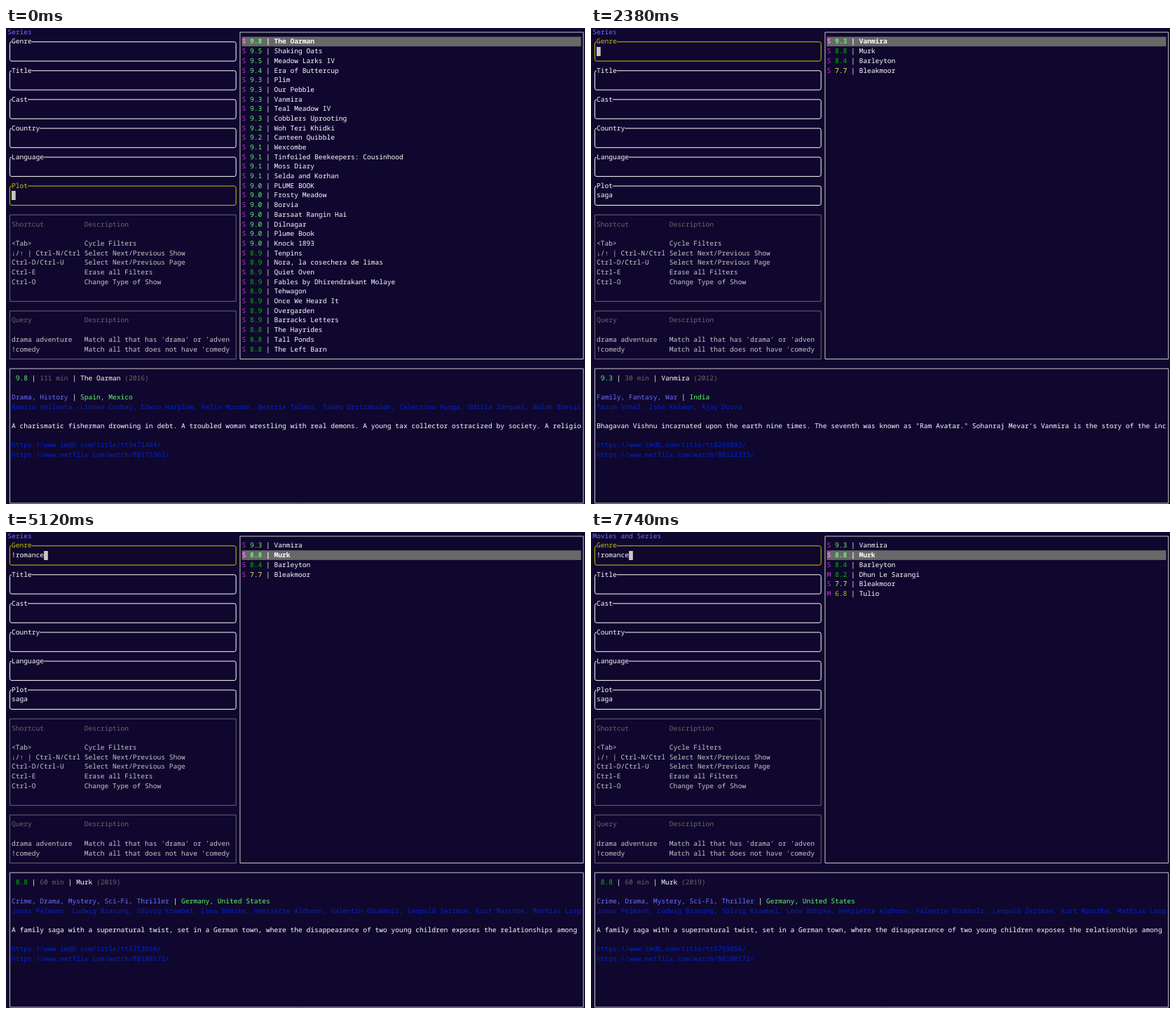
Recreate the animation shown at these times as an HTML page with a canvas. Size 826 by 678 pixels, loop 8 s.

```html
<!DOCTYPE html>
<html lang="en">
<head>
<meta charset="utf-8">
<title>Show finder</title>
<style>
html, body { margin: 0; width: 100%; height: 100%; overflow: hidden; background: #10072e; }
canvas { display: block; }
</style>
</head>
<body>
<canvas id="term" width="826" height="678"></canvas>
<script>
const ctx = document.getElementById('term').getContext('2d');
const LOOP = 8000;
const CW = 5.762, RH = 13.69, X0 = 2.2, Y0 = -1.2;
const C = {
  bg: '#10072e', white: '#fefefe', text: '#c7c7c7', grey: '#686868',
  blue: '#0225c7', sky: '#6871ff', green: '#00c200', lime: '#5ffa68',
  yellow: '#c7c400', lemon: '#fffc67', magenta: '#c930c7', pink: '#ff77ff'
};
const FONT = '9.6px "Noto Sans Mono", "DejaVu Sans Mono", monospace';

const FIELDS = ['Genre', 'Title', 'Cast', 'Country', 'Language', 'Plot'];
const KEYS = [
  ['<Tab>', 'Cycle Filters'],
  ['↓/↑ | Ctrl-N/Ctrl', 'Select Next/Previous Show'],
  ['Ctrl-D/Ctrl-U', 'Select Next/Previous Page'],
  ['Ctrl-E', 'Erase all Filters'],
  ['Ctrl-O', 'Change Type of Show']
];
const QUERIES = [
  ['drama adventure', "Match all that has 'drama' or 'adven"],
  ['!comedy', "Match all that does not have 'comedy"]
];

// Each line: rating, then titles sharing it; a leading * marks a movie.
const parse = src => src.trim().split('\n').flatMap(line => {
  const [score, titles] = line.trim().split(' = ');
  return titles.split('; ').map(t => ({
    score, type: t[0] === '*' ? 'M' : 'S', title: t.replace('*', '')
  }));
});

const ALL = parse(`
  9.8 = The Oarman
  9.5 = Shaking Oats; Meadow Larks IV
  9.4 = Era of Buttercup
  9.3 = Plim; Our Pebble; Vanmira; Teal Meadow IV; Cobblers Uprooting
  9.2 = Woh Teri Khidki; Canteen Quibble
  9.1 = Wexcombe; Tinfoiled Beekeepers: Cousinhood; Moss Diary; Selda and Korhan
  9.0 = PLUME BOOK; Frosty Meadow; Borvia; Barsaat Rangin Hai; Dilnagar; Plume Book; Knock 1893
  8.9 = Tenpins; Nora, la cosechera de limas; Quiet Oven; Fables by Dhirendrakant Molaye
  8.9 = Tehwagon; Once We Heard It; Overgarden; Barracks Letters
  8.8 = The Hayrides; Tall Ponds; The Left Barn`);
const SA = parse(`
  9.3 = Vanmira; Cobblers Uprooting
  9.0 = PLUME BOOK; Borvia; Barsaat Rangin Hai; Dilnagar; Plume Book; Knock 1893
  8.8 = Peculiar Teapot; Murk; Two-Spoon Guy
  8.7 = Gilded Plums; Tobb Wendlecot Has a Sofa
  8.6 = Hiya Walrus; Brenkel
  8.5 = The AV Squad; Tinfoiled Beekeeper; Neighbors of Cutlery
  8.5 = The Dull Lantern: Era of Buttermilk; Puzzled Biscuit Orchard 4100; TinFoiled Beekeeper
  8.4 = Barleyton; Parcel of Intrigue; The Next Duchess; Gulley; Badge of Cocoa
  8.4 = The Walrus Squire; Nieces Cabin; Gulley; Gulley
  8.3 = Brackwen; Baron Meiko: The Worn Fabric; Stella Runi Hanoka Runica`);
const SAGA = parse(`
  9.3 = Vanmira
  8.8 = Murk
  8.4 = Barleyton
  7.7 = Bleakmoor`);
const SAG = SAGA.concat(parse('7.4 = Postcards of Yarn; Umbrella Cottage'));
const MIXED = parse(`
  9.3 = Vanmira
  8.8 = Murk
  8.4 = Barleyton
  8.2 = *Dhun Le Sarangi
  7.7 = Bleakmoor
  6.8 = *Tulio`);

const INFO = {
  'The Oarman': {
    min: 111, year: 2016, genres: 'Drama, History', lands: 'Spain, Mexico',
    cast: 'Ramiro Vellanta, Linnea Corbay, Edwin Harglow, Felix Mordan, Beatrix Tolmer, Tadeo Urrizabalde, Celestino Purga, Odilia Zánquez, Nolan Brevic',
    plot: 'A charismatic fisherman drowning in debt. A troubled woman wrestling with real demons. A young tax collector ostracized by society. A religio',
    imdb: 'tt9471404', watch: '80171962'
  },
  'Vanmira': {
    min: 30, year: 2012, genres: 'Family, Fantasy, War', lands: 'India',
    cast: 'Tarun Vohal, Isha Kelwan, Ajay Dorva',
    plot: 'Bhagavan Vishnu incarnated upon the earth nine times. The seventh was known as "Ram Avatar." Sohanraj Mevar\'s Vanmira is the story of the inc',
    imdb: 'tt0268093', watch: '80122233'
  },
  'Murk': {
    min: 60, year: 2019, genres: 'Crime, Drama, Mystery, Sci-Fi, Thriller', lands: 'Germany, United States',
    cast: 'Jonas Pelmann, Ludwig Brasung, Sölvig Krambel, Lena Böhrke, Henriette Aldhorn, Valentin Grubholz, Leopold Zeitman, Kurt Maschbe, Mathias Lorp',
    plot: 'A family saga with a supernatural twist, set in a German town, where the disappearance of two young children exposes the relationships among',
    imdb: 'tt5753856', watch: '80100172'
  },
  'Barleyton': {
    min: 45, year: 2018, genres: 'Drama, Family', lands: 'Canada',
    cast: 'Maren Tilcott, Shane Worvil, Gemma Lasker, Peter Oldwyn, Kara Brenmoor, Hugh Delby',
    plot: 'A multi-generational saga set on a family ranch, where two sisters and their grandfather get through the highs and lows of life in the hills',
    imdb: 'tt1094229', watch: '70171946'
  },
  'Bleakmoor': {
    min: 60, year: 2017, genres: 'Crime, Drama, Western', lands: 'United States',
    cast: 'Dylan Hartwell-Stone, Brendan Moult, Clara Wynde, Jolanda Perrin, Bartholomew Ostendahl, Rosalyn Mae Thorncote, Sam Olber',
    plot: 'An epic saga about the secret history of the 1930s American grassland, centering on the mythic conflict and bloody struggle between big money',
    imdb: 'tt6106704', watch: '80176771'
  }
};

// Each step changes part of the state from its time on.
const STEPS = [
  [0, { mode: 'Series', focus: 5, genre: '', plot: '', list: ALL, sel: 0 }],
  [710, { plot: 's' }],
  [1010, { plot: 'sa', list: SA }],
  [1270, { plot: 'sag', list: SAG }],
  [1480, { plot: 'saga', list: SAGA }],
  [2380, { focus: 0 }],
  [3280, { genre: '!' }],
  [3640, { genre: '!r', list: [] }],
  [3720, { genre: '!ro', list: SAGA }],
  [3840, { genre: '!rom' }],
  [3960, { genre: '!roman' }],
  [4140, { genre: '!romanc' }],
  [4320, { genre: '!romance' }],
  [5120, { sel: 1 }],
  [5480, { sel: 2 }],
  [5950, { sel: 3 }],
  [6820, { mode: 'Movies and Series', list: MIXED, sel: 0 }],
  [7740, { sel: 1 }]
];

const colX = c => X0 + c * CW;
const rowY = r => Y0 + r * RH;
// Border lines sit slightly right of and below the cell centre.
const midX = c => colX(c + 0.5) + 0.4;
const midY = r => rowY(r + 0.5) + 0.4;

function write(col, row, str, color, bold) {
  ctx.font = (bold ? '700 ' : '500 ') + FONT;
  ctx.fillStyle = color;
  const y = rowY(row + 0.5) + 3.1;
  let c = col;
  for (const ch of str) {
    if (ch !== ' ') ctx.fillText(ch, colX(c), y);
    c++;
  }
  return c;
}

// Writes coloured runs one after another.
function runs(col, row, parts, bold) {
  for (const [str, color] of parts) col = write(col, row, str, color, bold);
}

function fillCells(c0, c1, row, color) {
  ctx.fillStyle = color;
  ctx.fillRect(colX(c0), rowY(row), (c1 - c0) * CW, RH);
}

function cursor(col, row) {
  ctx.fillStyle = C.text;
  ctx.fillRect(colX(col), Math.ceil(rowY(row)), CW, 13);
}

function box(c0, r0, c1, r1, color, radius = 0) {
  const x = midX(c0), y = midY(r0);
  ctx.strokeStyle = color;
  ctx.lineWidth = 1;
  ctx.beginPath();
  ctx.roundRect(x, y, midX(c1) - x, midY(r1) - y, radius);
  ctx.stroke();
}

function field(i, value, focused) {
  const row = 1 + i * 3, name = FIELDS[i];
  const color = focused ? C.yellow : C.white;
  box(0, row, 56, row + 2, color, 2.5);
  fillCells(1, 1 + name.length, row, C.bg);
  write(1, row, name, color);
  const end = write(1, row + 1, value, C.white);
  if (focused) cursor(end, row + 1);
}

function table(r0, r1, head, rows) {
  box(0, r0, 56, r1, C.grey);
  write(1, r0 + 1, head, C.grey);
  write(19, r0 + 1, 'Description', C.grey);
  rows.forEach(([a, b], i) => {
    write(1, r0 + 3 + i, a, C.text);
    write(19, r0 + 3 + i, b, C.text);
  });
}

const scoreColor = s => ({ 9: C.lime, 8: C.green, 7: C.lemon })[s[0]] || C.yellow;
const bright = color => ({ [C.green]: C.lime, [C.yellow]: C.lemon })[color] || color;

function showList(list, sel) {
  box(57, 0, 142, 34, C.text);
  list.forEach(({ type, score, title }, i) => {
    const on = i === sel, color = scoreColor(score);
    if (on) fillCells(58, 142, i + 1, C.grey);
    runs(58, i + 1, [
      [type + ' ', on ? C.pink : C.magenta],
      [score, on ? bright(color) : color],
      [' | ' + title, C.white]
    ], on);
  });
}

function details(show) {
  box(0, 35, 142, 49, C.text);
  if (!show) {
    write(1, 36, 'Please select a Movie or Show', C.text);
    return;
  }
  const d = INFO[show.title];
  runs(2, 36, [
    [show.score, scoreColor(show.score)], [' | ', C.white],
    [d.min + ' min', C.grey], [' | ' + show.title, C.white],
    [` (${d.year})`, C.grey]
  ]);
  runs(1, 38, [[d.genres, C.sky], [' | ', C.white], [d.lands, C.lime]]);
  write(1, 39, d.cast, C.blue);
  write(1, 41, d.plot, C.white);
  write(1, 43, `https://www.imdb.com/title/${d.imdb}/`, C.blue);
  write(1, 44, `https://www.netflix.com/watch/${d.watch}/`, C.blue);
}

function draw(t) {
  const s = Object.assign({}, ...STEPS.filter(([at]) => at <= t).map(step => step[1]));
  ctx.fillStyle = C.bg;
  ctx.fillRect(0, 0, 826, 678);
  write(0, 0, s.mode, C.sky);
  FIELDS.forEach((name, i) => field(i, s[name.toLowerCase()] || '', i === s.focus));
  table(19, 28, 'Shortcut', KEYS);
  table(29, 34, 'Query', QUERIES);
  showList(s.list, s.sel);
  details(s.list[s.sel]);
}

ctx.textRendering = 'geometricPrecision';
const start = performance.now();
function tick() {
  draw((performance.now() - start) % LOOP);
  requestAnimationFrame(tick);
}
tick();
</script>
</body>
</html>
```
